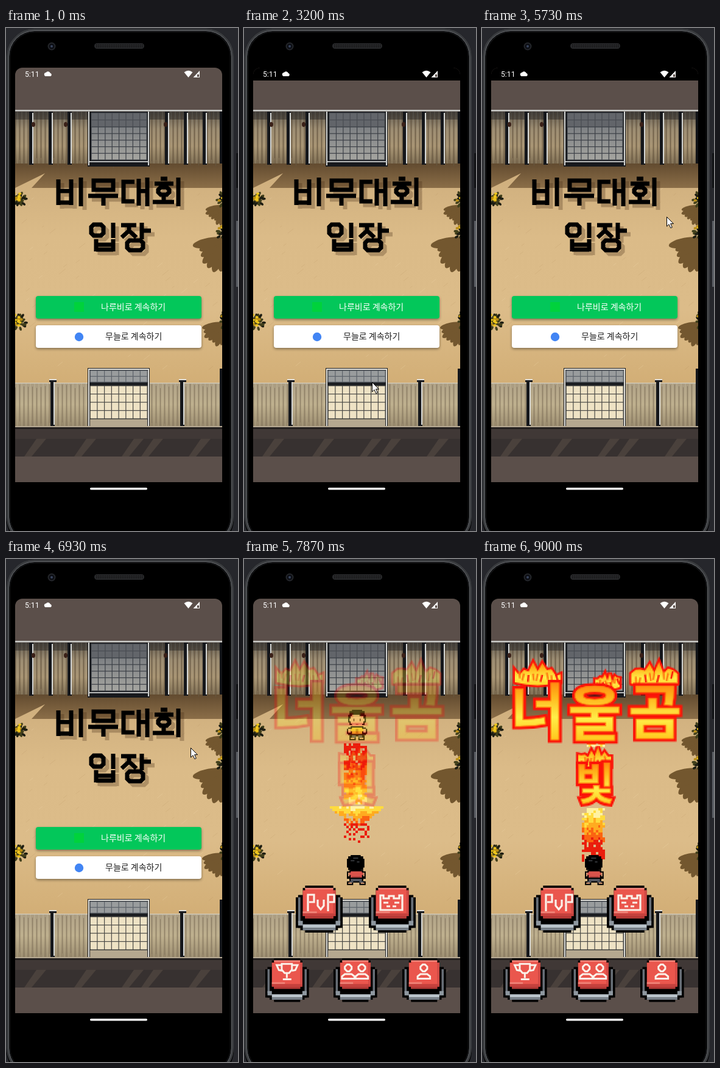
Write an HTML page with a canvas that moves like this. It is 381 by 824 pixels and loops after 9070 ms.

```html
<!DOCTYPE html>
<html lang="ko">
<head>
<meta charset="utf-8">
<title>로그인</title>
<style>
html, body { margin: 0; width: 100%; height: 100%; overflow: hidden; background: #1d1e22; }
canvas { display: block; }
</style>
</head>
<body>
<canvas id="stage" width="381" height="824"></canvas>
<script>
const W = 381, H = 824, LOOP = 9070;
const SANS = 'Roboto, "Noto Sans CJK KR", "Noto Sans CJK JP", sans-serif';
const HANGUL = '"Noto Sans CJK KR", "Noto Sans CJK JP", sans-serif';
const ctx = document.getElementById('stage').getContext('2d');

const clamp = v => Math.max(0, Math.min(1, v));
const span = (t, a, b) => clamp((t - a) / (b - a));
const hash = (a, b, c = 0) => {
  const v = Math.sin(a * 127.1 + b * 311.7 + c * 74.7) * 43758.5453;
  return v - Math.floor(v);
};

function layer(draw, scale = 1) {
  const el = document.createElement('canvas');
  el.width = Math.ceil(W * scale);
  el.height = Math.ceil(H * scale);
  const c = el.getContext('2d');
  c.scale(scale, scale);
  draw(c);
  return el;
}
function rect(c, color, x, y, w, h) {
  c.fillStyle = color;
  c.fillRect(x, y, w, h);
}
function rounded(c, color, x, y, w, h, r) {
  c.fillStyle = color;
  c.beginPath();
  c.roundRect(x, y, w, h, r);
  c.fill();
}
function oval(c, color, x, y, rx, ry = rx, turn = 0) {
  c.fillStyle = color;
  c.beginPath();
  c.ellipse(x, y, rx, ry, turn, 0, 7);
  c.fill();
}
function shape(c, color, d) {
  c.fillStyle = color;
  c.fill(new Path2D(d));
}
function line(c, color, width, d) {
  c.strokeStyle = color;
  c.lineWidth = width;
  c.stroke(new Path2D(d));
}
function text(c, str, x, y, font, color, align = 'left') {
  c.font = font;
  c.fillStyle = color;
  c.textAlign = align;
  c.fillText(str, x, y);
  return x + c.measureText(str).width;
}
function fade(c, y0, y1, ...colors) {
  const g = c.createLinearGradient(0, y0, 0, y1);
  colors.forEach((col, i) => g.addColorStop(i / (colors.length - 1), col));
  return g;
}

// Phone body
const phone = layer(c => {
  rect(c, '#26272c', 0, 0, W, H);
  rect(c, '#111215', 378, 205, 3, 57);
  rect(c, '#5b5e64', 378, 316, 3, 108);
  rounded(c, '#000', 1, 1, 373, 850, 46);
  const ring = (color, width, inset) => {
    c.strokeStyle = color;
    c.lineWidth = width;
    c.beginPath();
    c.roundRect(1 + inset, 1 + inset, 373 - 2 * inset, 846 - 2 * inset, 46 - inset);
    c.stroke();
  };
  ring('#3a3c3f', 4, 2);
  ring('#66696d', 1, 3.5);
  ring('#141517', 1.5, 5.5);
  oval(c, '#24262a', 75, 30, 6.5);
  oval(c, '#0c0e14', 75, 30, 4.5);
  oval(c, '#39445c', 75, 30, 2);
  rounded(c, '#28292b', 145, 25, 82, 9, 4.5);
  for (let x = 148; x < 225; x += 3)
    for (let y = 27; y < 33; y += 3) rect(c, '#0c0c0d', x, y, 1.5, 1.5);
});

// Courtyard
function slats(c, x0, x1, y, h, fill, dark) {
  rect(c, fill, x0, y, x1 - x0, h);
  for (let x = x0; x < x1; x += 7) {
    rect(c, dark, x, y + hash(x, y) * 8, 1, h - hash(x, 3) * 12);
    rect(c, 'rgba(255,240,205,.12)', x + 3, y, 2, h);
  }
}
function grid(c, x, y, w, h, nx, ny, fill, ink) {
  rect(c, fill, x, y, w, h);
  for (let i = 0; i <= nx; i++) rect(c, ink, x + i * w / nx - .5, y, 1.2, h);
  for (let i = 0; i <= ny; i++) rect(c, ink, x, y + i * h / ny - .5, w, 1.2);
}
function post(c, x, y, h) {
  rect(c, '#15171b', x, y, 7, h);
  rect(c, '#d5d7d5', x + 5, y + 2, 2, h - 4);
}
function plant(c, x, y, seed) {
  for (let i = 0; i < 34; i++) {
    const a = hash(i, seed) * 6.3, d = hash(seed, i) * 13;
    oval(c, i % 3 ? '#42401c' : '#1d1d12', x + Math.cos(a) * d, y + Math.sin(a) * d * 1.1, 3.4, 2, a);
  }
  for (let i = 0; i < 13; i++) {
    const a = hash(i, seed, 4) * 6.3, d = hash(seed, i, 9) * 12;
    oval(c, i % 3 ? '#eec51d' : '#b98d16', x + Math.cos(a) * d, y - 3 + Math.sin(a) * d * .9, 2.6, 2);
  }
}
// Fan of leaf shadows spreading to the lower left of a plant
function leafShade(c, x, y, reach) {
  for (let i = 0; i < 7; i++) {
    const a = 1.75 + i * .2, r = reach * (.8 + hash(i, y) * .2);
    oval(c, '#73572f', x + Math.cos(a) * r * .55, y + Math.sin(a) * r * .55, r * .5, r * .15, a);
  }
}
const arena = layer(c => {
  rect(c, '#5b4f4a', 15, 65, 340, 679);
  rect(c, fade(c, 222, 582, '#cdad7c', '#dbbb88', '#dcbc89', '#d2ae76'), 15, 222, 340, 380);
  for (let i = 0; i < 70; i++) {
    const x = 20 + hash(i, 1) * 325, y = 265 + hash(i, 2) * 300, d = 3 + hash(i, 3) * 8;
    line(c, i % 2 ? 'rgba(255,235,195,.2)' : 'rgba(150,110,60,.12)', 1, `M${x} ${y}l${d} ${-d * .8}`);
  }
  shape(c, fade(c, 222, 262, 'rgba(62,42,22,.75)', 'rgba(80,54,26,.55)'), 'M15 222H355V262H42L64 238 15 262Z');

  slats(c, 15, 355, 137, 85, fade(c, 137, 222, '#565047', '#93836a', '#a08c6c', '#75654c'), '#655640');
  rect(c, 'rgba(25,25,28,.4)', 15, 137, 340, 13);
  rect(c, '#c8c9c6', 15, 134, 340, 2.5);
  for (const x of [38, 70, 101, 261, 292, 323]) post(c, x, 137, 87);
  for (const x of [45, 98, 262]) oval(c, '#3a2018', x, 158, 3, 4);
  rect(c, '#111317', 351, 137, 4, 85);
  rect(c, '#17191d', 134, 137, 102, 90);
  grid(c, 140, 139, 91, 23, 8, 2, '#62656a', '#494c52');
  grid(c, 140, 162, 91, 54, 8, 5, fade(c, 162, 216, '#7d8083', '#a5a5a0'), '#3c4047');
  rect(c, '#d7d8d5', 135, 137, 2, 88);
  rect(c, '#d7d8d5', 233, 137, 2, 88);
  rect(c, '#b9bbbb', 137, 218, 97, 2);

  leafShade(c, 358, 292, 32);
  leafShade(c, 362, 346, 56);
  leafShade(c, 360, 484, 40);
  plant(c, 21, 281, 1);
  plant(c, 21, 482, 2);
  plant(c, 360, 280, 3);
  plant(c, 360, 336, 5);
  plant(c, 361, 480, 7);

  slats(c, 15, 355, 582, 71, fade(c, 582, 652, '#aa9c82', '#b8a988', '#95866a'), '#85775f');
  rect(c, '#d2cab8', 15, 581, 340, 1.5);
  rect(c, '#14161a', 351, 558, 4, 95);
  for (const x of [73, 286]) {
    post(c, x, 576, 76);
    rect(c, '#e0ded8', x - 2, 575, 12, 2);
    rect(c, '#1a1c20', x - 2, 577, 12, 3);
  }
  rect(c, '#1b1d21', 134, 557, 102, 95);
  grid(c, 138, 561, 94, 19, 8, 2, '#999c9d', '#5c6269');
  grid(c, 138, 586, 94, 54, 8, 4, '#eee2c4', '#4b4a47');
  rect(c, '#b5a88f', 138, 641, 94, 11);
  rect(c, '#e3e2dc', 135, 558, 100, 2);
  rect(c, '#e3e2dc', 135, 558, 2, 94);
  rect(c, '#e3e2dc', 233, 558, 2, 94);
  rect(c, '#b5a892', 15, 652, 340, 2);
  rect(c, '#24201f', 15, 654, 340, 3);
  rect(c, '#403836', 15, 657, 340, 16);
  rect(c, '#373130', 15, 673, 340, 29);
  for (const x of [30, 112, 190, 222, 300])
    shape(c, '#4a413c', `M${x} 702L${x + 20} 673H${x + 36}L${x + 12} 702Z`);
});

// Login page
const ring = (x, y, rx, ry) =>
  `M${x - rx + 4} ${y - ry}H${x + rx - 4}L${x + rx} ${y - ry + 4}V${y + ry - 4}L${x + rx - 4} ${y + ry}H${x - rx + 4}L${x - rx} ${y + ry - 4}V${y - ry + 4}Z`;
const heading = 'M86 248V290M107 248V290M86 267H107M86 286H107M123 245V292' +
  'M144 250H176V265H144ZM135 275H184M160 275V291' +
  'M211 252H193V284H211M218 247V291M232 245V292M218 267H232' +
  'M254 247H265M244 255H275M259 274V285M241 285H276M283 245V292' + ring(259, 267, 9, 6) +
  'M176 319V344M148 346V366M176 346V366M148 355H176M148 363H176' + ring(150, 331, 10, 9) +
  'M189 323H214M202 323V332L190 343M202 332L214 343M223 319V346M223 332H238' + ring(212, 356, 13, 8);
const login = layer(c => {
  c.drawImage(arena, 0, 0);
  c.save();
  c.translate(6, 6);
  line(c, 'rgba(70,45,20,.3)', 7, heading);
  c.restore();
  line(c, '#000', 7, heading);
  const button = (y, fill, label, x, ink) => {
    c.save();
    c.shadowColor = 'rgba(0,0,0,.4)';
    c.shadowBlur = 4;
    c.shadowOffsetY = 2;
    rounded(c, fill, 49, y, 272, 37, 4);
    c.restore();
    text(c, label, x, y + 23, '14px ' + HANGUL, ink);
  };
  button(439, '#03c75a', '나루비로 계속하기', 156, '#fff');
  button(487, '#fff', '무늘로 계속하기', 163, '#1f1f1f');
  rect(c, '#00d23c', 112, 449, 16, 16);
  oval(c, '#4285f4', 120, 506, 7.2);
});

// Account chooser
const dialog = layer(c => {
  const grey = '#5f6368', ink = '#202124', blue = '#1a73e8', body = '12.25px ' + SANS;
  rounded(c, '#fff', 37, 238, 296, 353, 8);
  oval(c, '#3a1a12', 185, 280, 21);
  text(c, 'Choose an account', 185, 335, '21px ' + SANS, ink, 'center');
  text(c, 'to continue to 너울곰 빛', 185, 364, '13.7px ' + SANS, ink, 'center');
  oval(c, '#01579b', 70, 415, 12.3);
  text(c, '남', 70, 419, '11.5px ' + HANGUL, '#fff', 'center');
  text(c, '남보슬', 93, 414, '500 12.4px ' + HANGUL, ink);
  text(c, 'nambosuel@example.com', 93, 429, '11px ' + SANS, grey);
  rect(c, '#dadce0', 58, 442, 254, 1);
  rect(c, '#dadce0', 58, 484, 254, 1);
  line(c, grey, 1.5, 'M70.5 459.5a2.7 2.7 0 1 1-5.4 0a2.7 2.7 0 1 1 5.4 0M62.5 468.3V467Q62.5 464.8 67.8 464.8T73 467V468.3ZM75.5 458V465M72 461.5H79');
  text(c, 'Add another account', 89, 467, '500 13px ' + SANS, ink);
  text(c, 'To continue, Muneul will share your name,', 58, 512, body, grey);
  text(c, 'email address, and profile picture with 너울', 58, 531, body, grey);
  let x = text(c, '곰 빛. Before using this app, review its ', 58, 550, body, grey);
  text(c, 'privacy', x, 550, body, blue);
  x = text(c, 'policy', 58, 567, body, blue);
  x = text(c, ' and ', x, 567, body, grey);
  x = text(c, 'terms of service', x, 567, body, blue);
  text(c, '.', x, 567, body, grey);
});

// Burning game title, kept at half size for coarse pixels
const title = layer(c => {
  const red = '#fb1408';
  const fire = (y0, y1) => fade(c, y0, y1, '#ff6a0c', '#ffb41a', '#ffee48', '#ffc81e');
  c.lineJoin = 'miter';
  c.miterLimit = 3;
  const blaze = (x, y, w, h) => {
    let d = `M${x} ${y + h}`;
    for (let i = 0; i <= 10; i++) {
      const lift = i % 2 ? .25 + hash(i, x) * .3 : 1 - Math.abs(i - 5) * .09 - hash(x, i) * .2;
      d += `L${x + w * i / 10} ${y + h - h * lift}`;
    }
    d += `L${x + w} ${y + h}Q${x + w / 2} ${y + h * 1.25} ${x} ${y + h}Z`;
    line(c, red, 7, d);
    shape(c, fire(y, y + h * 1.2), d);
    for (let i = 1; i < 10; i++)
      line(c, i % 3 ? '#ff7a10' : red, 3, `M${x + w * i / 10} ${y + h * (.5 + hash(i, x, 2) * .3)}l${hash(x, i, 5) * 8 - 4} ${h * .3}`);
  };
  const letter = (s, x, y, size) => {
    c.font = `700 ${size}px ${HANGUL}`;
    c.textAlign = 'center';
    c.lineWidth = 10;
    c.strokeStyle = red;
    c.strokeText(s, x, y);
    c.fillStyle = fire(y - size, y + 10);
    c.fillText(s, x, y);
    c.lineWidth = 1.5;
    c.strokeStyle = '#ff8a10';
    c.strokeText(s, x, y);
  };
  blaze(54, 164, 75, 38);
  blaze(186, 180, 40, 30);
  blaze(245, 162, 76, 42);
  blaze(158, 303, 54, 38);
  letter('너', 91, 285, 98);
  letter('울', 185, 287, 96);
  letter('곰', 284, 286, 96);
  letter('빛', 185, 393, 70);
}, .5);

// Game sprites: [colour, x, y, w, h]
function sprite(parts, x, y, size) {
  ctx.save();
  ctx.translate(x, y);
  ctx.scale(size, size);
  for (const p of parts) rect(ctx, ...p);
  ctx.restore();
}
const key = [
  ['#000', 4, 0, 12, 20], ['#000', 3, 1, 14, 18], ['#000', 1, 4, 18, 14], ['#000', 0, 5, 20, 13], ['#000', 2, 17, 16, 2],
  ['#686f77', 1, 5, 1, 11], ['#686f77', 18, 5, 1, 11], ['#8e979f', 1, 15, 2, 2], ['#8e979f', 17, 15, 2, 2],
  ['#b9c3ca', 3, 16.5, 14, 1.5], ['#7a838c', 3, 18, 14, 1],
  ['#ea564d', 4, 1, 12, 13], ['#ea564d', 3, 2, 14, 11], ['#f58b80', 4, 1, 12, .6],
  ['#f08478', 3, 11, 6, .8], ['#c5413d', 3, 11.8, 14, 1.2], ['#b23835', 4, 13, 12, 1], ['#d04a45', 16, 2, 1, 10]
];
const person = x => ring(x, 17, 6, 6) + `M${x - 11} 36V32L${x - 6} 28H${x + 6}L${x + 11} 32V36Z`;
const buttons = [
  [85, 535, 1, 'M20 42V15H30V27H22M36 23V33L41 39 46 33V23M53 42V15H63V27H55'],
  [205, 535, 1, 'M19 40V16H24V21H33V17H41V21H50V16H55V40ZM24 28H32M42 28H50M29 34H35M39 34H45'],
  [35, 654, .93, 'M29 10H47V20L42 26H34L29 20ZM29 12H20L24 21 30 22M47 12H57L53 21 47 22M38 26V35M31 37H46'],
  [147, 654, .93, person(26) + person(50)],
  [260, 654, .93, person(38)]
];
const player = [
  ['#000', 4, 0, 8, 13], ['#000', 2, 1, 12, 11], ['#000', 1, 3, 14, 7], ['#33363a', 6, 2, 4, 1], ['#33363a', 4, 4, 3, 1], ['#33363a', 9, 5, 2, 1],
  ['#000', 3, 12, 11, 8], ['#000', 1, 13, 15, 6], ['#000', 3, 18, 11, 4], ['#000', 1, 21, 5, 3], ['#000', 11, 21, 5, 3],
  ['#d9544c', 4, 13, 9, 5], ['#d9544c', 3, 14, 11, 2], ['#a83c38', 5, 17, 7, 1],
  ['#e3a478', 2, 14, 1, 3], ['#e3a478', 14, 14, 1, 3], ['#51555e', 4, 19, 9, 2], ['#51555e', 3, 21, 3, 1], ['#51555e', 11, 21, 3, 1],
  ['#d59a72', 2, 22, 3, 1], ['#d59a72', 12, 22, 3, 1]
];
const rival = [
  ['#000', 4, 0, 8, 14], ['#000', 2, 1, 12, 11], ['#000', 1, 4, 14, 6],
  ['#000', 3, 13, 10, 8], ['#000', 1, 14, 14, 6], ['#000', 0, 15, 16, 4], ['#000', 2, 20, 5, 4], ['#000', 9, 20, 5, 4],
  ['#eeb086', 3, 5, 10, 6], ['#eeb086', 4, 4, 6, 1], ['#eeb086', 2, 7, 12, 2], ['#eeb086', 4, 11, 8, 2],
  ['#5f3324', 5, 7, 1, 2], ['#5f3324', 10, 7, 1, 2], ['#b96b50', 7, 11, 2, 1],
  ['#efc42f', 4, 14, 8, 5], ['#efc42f', 3, 15, 10, 2], ['#b98c1b', 7, 15, 2, 4],
  ['#eeb086', 1, 15, 2, 3], ['#eeb086', 13, 15, 2, 3], ['#4d515a', 4, 20, 3, 2], ['#4d515a', 9, 20, 3, 2],
  ['#eeb086', 3, 22, 3, 1], ['#eeb086', 10, 22, 3, 1]
];
const heat = ['#fff2a2', '#ffdb3e', '#ffab20', '#fb6412', '#ea1e0d', '#ea1e0d'];

// One square of fire; heatLoss runs from 0 (white hot) to 5 (red)
function ember(k, y, heatLoss) {
  rect(ctx, heat[Math.min(5, Math.floor(heatLoss))], Math.round(164 + k * 3.8), Math.round(y), 4, 4);
}
function flame(head, tail, seed) {
  const dir = Math.sign(tail - head), rows = Math.floor(Math.abs(tail - head) / 4);
  for (let r = 0; r < rows; r++)
    for (let k = 0; k < 10; k++) {
      const q = r / rows;
      if (hash(r, k, seed) < q * .95 - .45 || (r < 2 && k < 2) || (k % 9 === 0 && hash(r, k, seed) < .35)) continue;
      ember(k, head + dir * r * 4 - (dir < 0 ? 4 : 0), q * 6 + hash(k, r, seed) * 1.2);
    }
}
function splash(p, seed) {
  for (let r = 0; r < 15; r++) {
    const half = Math.max(5, 11.5 - r * 1.2);
    for (let k = -11; k <= 11; k++) {
      if (Math.abs(k) > half || hash(r, k + 20, seed) < r * .07 + p * .25 - .25) continue;
      ember(k + 5, 405 + r * 4, r * .5 + Math.abs(k) * .1 + hash(k + 20, r, seed));
    }
  }
}

function game(t) {
  const loaded = t >= 7450, u = (t - 7150) % 1600, seed = Math.floor(t / 70) % 23;
  rect(ctx, '#000', 15, 65, 340, 679);
  if (loaded) {
    ctx.drawImage(arena, 0, 0);
    sprite(rival, 169, 247, 2.08);
    if (u > 230 && u < 950) flame(Math.min(402, 302 + (u - 230) * .3), 300 + 102 * span(u, 800, 950), seed);
  }
  if (u < 640) flame(Math.max(402, 466 - u * .23), 500 - 90 * span(u, 460, 640), seed + 5);
  if (u > 520 && u < 1000) splash(span(u, 520, 1000), seed);
  sprite(player, 167, 485, 2.05);
  for (const [x, y, size, icon] of buttons) {
    sprite(key, x, y, 3.85 * size);
    ctx.save();
    ctx.translate(x, y);
    ctx.scale(size, size);
    line(ctx, '#fbf1e9', 3.2, icon);
    ctx.restore();
  }
  ctx.save();
  ctx.globalAlpha = span(t, 7500, 8700);
  ctx.imageSmoothingEnabled = false;
  ctx.drawImage(title, 0, 0, title.width * 2, title.height * 2);
  ctx.restore();
}

function zoomed(size, alpha, draw) {
  ctx.save();
  ctx.globalAlpha = alpha;
  ctx.translate(185, 404.5);
  ctx.scale(size, size);
  ctx.translate(-185, -404.5);
  draw();
  ctx.restore();
}
function loginPage(t) {
  ctx.drawImage(login, 0, 0);
  if (t >= 2600 && t < 6100) rect(ctx, '#000', 15, 65, 340, 21);
  const show = span(t, 3540, 3740) * (1 - span(t, 4900, 5070));
  if (show) zoomed(.92 + .08 * show, show, () => ctx.drawImage(dialog, 0, 0));
}
function statusBar() {
  text(ctx, '5:11', 31, 80, '12.2px ' + SANS, '#fff');
  shape(ctx, '#fff', 'M66 79a3 3 0 0 1-.4-6a4 4 0 0 1 7.2 1a2.6 2.6 0 0 1 .2 5Z');
  shape(ctx, '#fff', 'M292.5 72.5Q299.5 67 306.5 72.5L299.5 81Z');
  shape(ctx, '#fff', 'M307.5 81 318 70V81Z');
  shape(ctx, '#5b4f4a', 'M314 76H317V80H314Z');
}

const route = [
  [1530, 378, 596], [1860, 283, 509], [2000, 308, 511], [2200, 308, 511], [2270, 280, 497],
  [2530, 280, 497], [3200, 210, 580], [3540, 210, 580], [4000, 130, 431], [4330, 150, 423],
  [4400, 150, 423], [4600, 122, 423], [4870, 122, 423], [5730, 303, 309], [6930, 303, 309],
  [7270, 334, 311], [7500, 384, 330]
];
function pointer(t) {
  const i = route.findIndex(p => p[0] > t);
  if (i < 1) return;
  const [t0, x0, y0] = route[i - 1], [t1, x1, y1] = route[i];
  const p = span(t, t0, t1), e = p * p * (3 - 2 * p);
  ctx.save();
  ctx.translate(x0 + (x1 - x0) * e, y0 + (y1 - y0) * e);
  const arrow = 'M.5 .5V16L4 12.6 6.8 18.6 9.3 17.5 6.6 11.6H11.5Z';
  shape(ctx, '#fff', arrow);
  line(ctx, '#000', 1, arrow);
  ctx.restore();
}

function frame(now) {
  const t = now % LOOP;
  ctx.drawImage(phone, 0, 0);
  ctx.save();
  ctx.beginPath();
  ctx.roundRect(15, 65, 340, 679, [12, 12, 0, 0]);
  ctx.clip();
  if (t < 7100) loginPage(t);
  else if (t < 7400) {
    const p = span(t, 7100, 7400), e = 1 - (1 - p) ** 2;
    zoomed(1 + .05 * e, 1, () => loginPage(t));
    rect(ctx, `rgba(0,0,0,${.6 * p})`, 15, 65, 340, 679);
    zoomed(.85 + .15 * e, Math.min(1, p * 4), () => game(t));
  } else game(t);
  statusBar();
  ctx.restore();
  rounded(ctx, '#fff', 138, 753, 94, 3.5, 1.75);
  pointer(t);
  requestAnimationFrame(frame);
}
requestAnimationFrame(frame);
</script>
</body>
</html>
```
